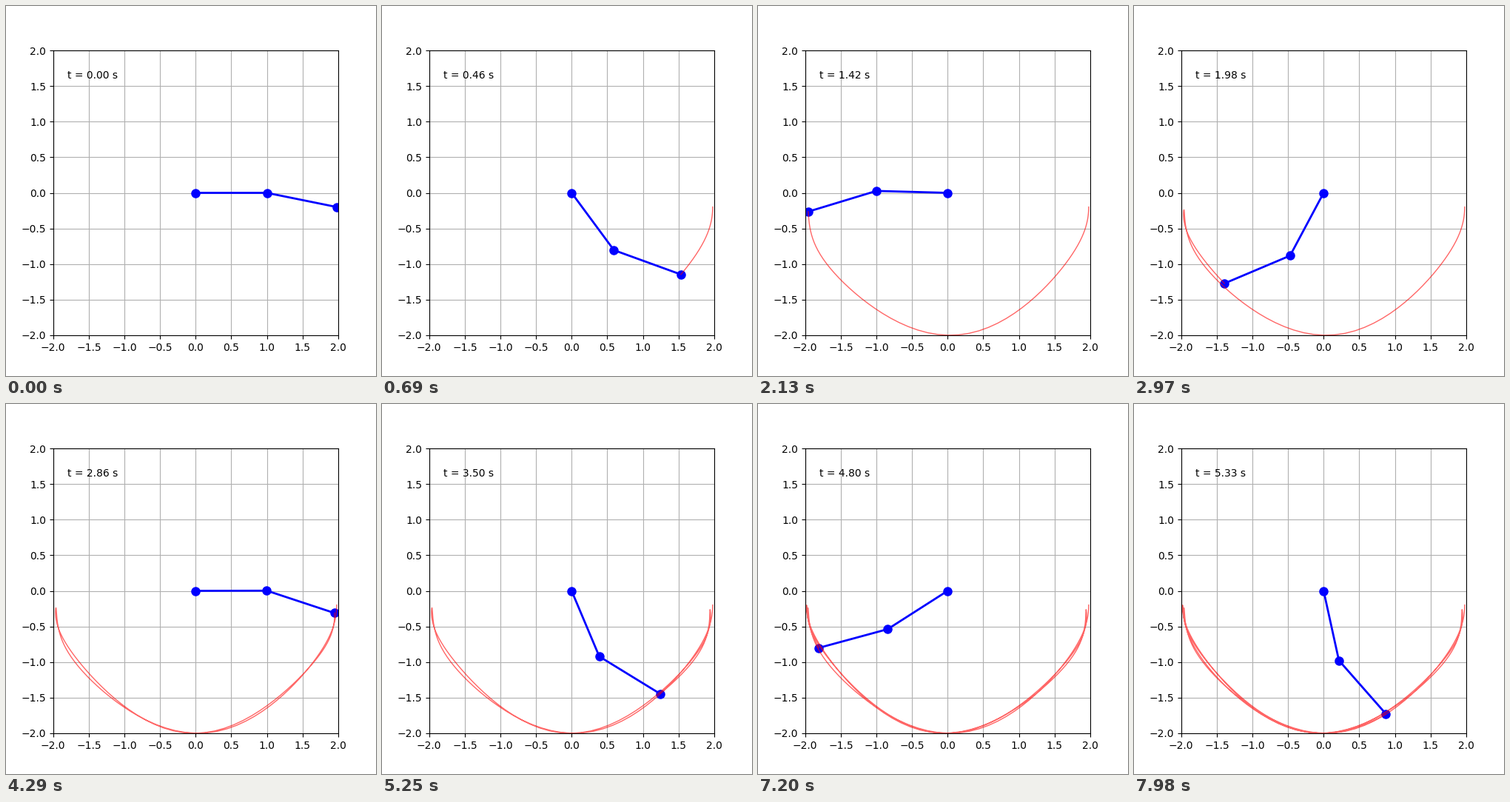
Animation of 500x500 px, one loop 8 s. Source, as a matplotlib script:

```python
import numpy as np
import matplotlib.pyplot as plt
from matplotlib.animation import FuncAnimation

G = 9.81            # gravity; both rods have length 1, both bobs mass 1
DT = 20 / 999       # simulated seconds per pose
POSES = 267
SUBSTEPS = 10
LOOP_MS, TICK_MS = 8000, 20


def deriv(s):
    a1, a2, w1, w2 = s
    d = a1 - a2
    c, sd = np.cos(d), np.sin(d)
    acc1 = (G * (c * np.sin(a2) - 2 * np.sin(a1))
            - sd * (c * w1**2 + w2**2)) / (2 - c**2)
    acc2 = w1**2 * sd - G * np.sin(a2) - c * acc1
    return np.array([w1, w2, acc1, acc2])


def rk4(s, h):
    k1 = deriv(s)
    k2 = deriv(s + h / 2 * k1)
    k3 = deriv(s + h / 2 * k2)
    k4 = deriv(s + h * k3)
    return s + h / 6 * (k1 + 2 * k2 + 2 * k3 + k4)


def simulate():
    state = np.array([np.pi / 2, np.pi / 2 - 0.2, 0.0, 0.0])
    angles = []
    for _ in range(POSES):
        angles.append(state[:2])
        for _ in range(SUBSTEPS):
            state = rk4(state, DT / SUBSTEPS)
    return np.array(angles).T


th1, th2 = simulate()
x1, y1 = np.sin(th1), -np.cos(th1)
x2, y2 = x1 + np.sin(th2), y1 - np.cos(th2)

fig, ax = plt.subplots(figsize=(5, 5), dpi=100)
ax.set(xlim=(-2, 2), ylim=(-2, 2))
ax.set_aspect("equal")
ax.grid()
rods, = ax.plot([], [], "o-", color="blue", lw=2, markersize=8)
trace, = ax.plot([], [], "-", color="red", lw=1, alpha=0.6)
clock = ax.text(0.05, 0.9, "", transform=ax.transAxes)


def draw(n):
    # each pose is held for 30 ms on a 20 ms clock
    i = min((2 * n + 1) // 3, POSES - 1)
    rods.set_data([0, x1[i], x2[i]], [0, y1[i], y2[i]])
    trace.set_data(x2[:i + 1], y2[:i + 1])
    clock.set_text(f"t = {i * DT:.2f} s")
    return rods, trace, clock


anim = FuncAnimation(fig, draw, frames=LOOP_MS // TICK_MS, interval=TICK_MS,
                     init_func=lambda: draw(0), repeat=True, repeat_delay=0)
plt.show()
```
